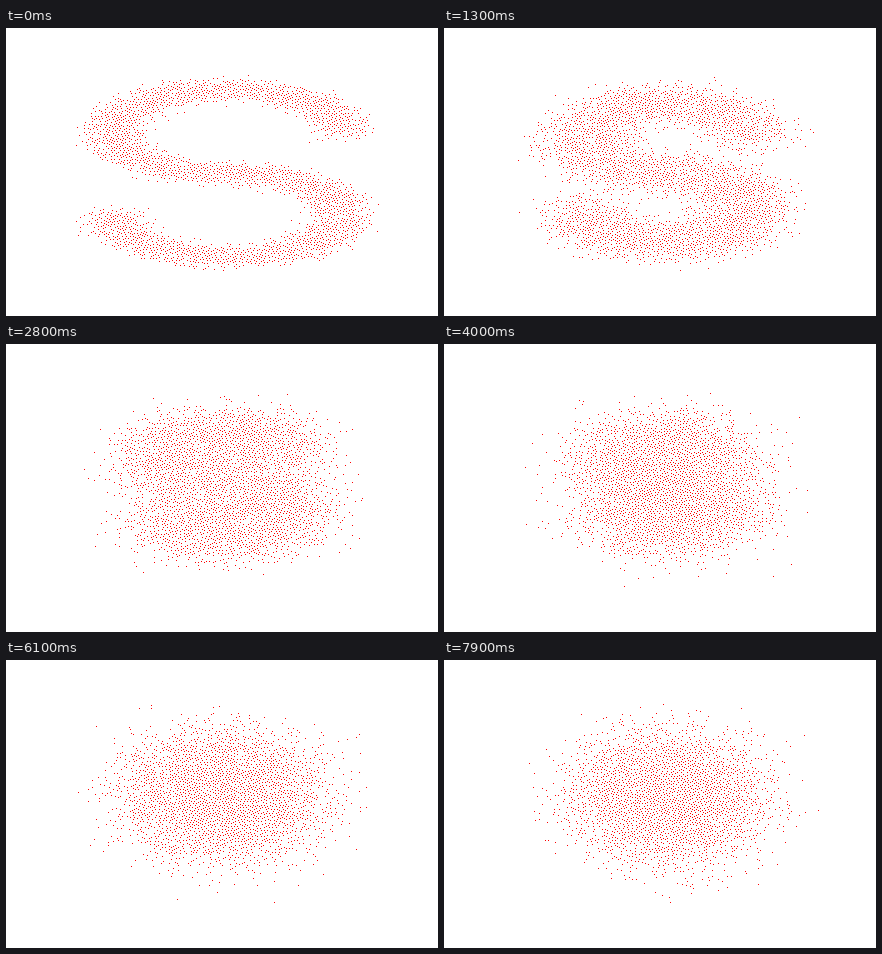
An HTML page with a canvas for the animation above (8000 ms loop, 432x288 px).

```html
<!DOCTYPE html>
<html lang="en">
<head>
<meta charset="utf-8">
<title>S-curve diffusion</title>
<style>
  html, body { margin: 0; width: 100%; height: 100%; overflow: hidden; background: #fff; }
  canvas { display: block; width: 432px; height: 288px; }
</style>
</head>
<body>
<canvas id="stage" width="432" height="288"></canvas>
<script>
const W = 432, H = 288;
const BOX = { left: 69, top: 44, right: 374, bottom: 242 };
const LOOP = 8000, STEP = 100, STEPS = 79;
const COUNT = 10000;
const CURVE_NOISE = 0.12, BETA_SLOPE = 6.5e-4;

// step, pixels per unit in x and y, centre x and y
const VIEW = [
  [0, 114, 41.7, 221, 145],
  [12, 84, 35.7, 222, 145],
  [27, 60, 28.5, 220, 140],
  [39, 49, 26.3, 223, 140],
  [51, 45, 25.3, 219, 135],
  [60, 46, 25, 217, 136],
  [78, 41, 26.5, 223, 137]
];

let seed = 20;
function random() {
  seed = (seed + 0x6D2B79F5) | 0;
  let t = Math.imul(seed ^ (seed >>> 15), 1 | seed);
  t = (t + Math.imul(t ^ (t >>> 7), 61 | t)) ^ t;
  return ((t ^ (t >>> 14)) >>> 0) / 4294967296;
}

function gaussianPair() {
  const radius = Math.sqrt(-2 * Math.log(1 - random()));
  const angle = 2 * Math.PI * random();
  return [radius * Math.cos(angle), radius * Math.sin(angle)];
}

function viewAt(step) {
  const i = Math.max(1, VIEW.findIndex(key => key[0] >= step));
  const a = VIEW[i - 1], b = VIEW[i];
  const mix = (step - a[0]) / (b[0] - a[0]);
  return a.map((value, n) => value + (b[n] - value) * mix);
}

const px = new Float32Array(COUNT), py = new Float32Array(COUNT);

function makeCurve() {
  for (let i = 0; i < COUNT; i++) {
    const t = 3 * Math.PI * (random() - 0.5);
    const [nx, ny] = gaussianPair();
    px[i] = Math.sin(t) + CURVE_NOISE * nx;
    py[i] = Math.sign(t) * (Math.cos(t) - 1) + CURVE_NOISE * ny;
  }
}

function diffuse(beta) {
  const keep = Math.sqrt(1 - beta), add = Math.sqrt(beta);
  for (let i = 0; i < COUNT; i++) {
    const [nx, ny] = gaussianPair();
    px[i] = keep * px[i] + add * nx;
    py[i] = keep * py[i] + add * ny;
  }
}

// Dots keep a small distance from each other, so dense areas stay evenly speckled.
function plot(step) {
  const [, sx, sy, cx, cy] = viewAt(step);
  const taken = new Uint8Array(W * H);
  const dots = [];
  for (let i = 0; i < COUNT; i++) {
    const x = Math.round(cx + px[i] * sx), y = Math.round(cy - py[i] * sy);
    if (x < BOX.left || x > BOX.right || y < BOX.top || y > BOX.bottom) continue;
    const at = y * W + x;
    if (taken[at]) continue;
    dots.push(at);
    for (let dy = -2; dy <= 2; dy++) {
      const reach = 2 - Math.abs(dy);
      taken.fill(1, at + dy * W - reach, at + dy * W + reach + 1);
    }
  }
  return dots;
}

makeCurve();
const frames = [];
for (let step = 0; step < STEPS; step++) {
  if (step) diffuse(BETA_SLOPE * step);
  frames.push(plot(step));
}

const ctx = document.getElementById("stage").getContext("2d");
let shown = -1;

function draw(step) {
  ctx.fillStyle = "#fff";
  ctx.fillRect(0, 0, W, H);
  ctx.fillStyle = "#f00";
  for (const at of frames[step]) ctx.fillRect(at % W, Math.floor(at / W), 1, 1);
}

function tick() {
  const time = performance.now() % LOOP;
  const step = Math.max(0, Math.floor(time / STEP) - 1);
  if (step !== shown) draw(shown = step);
  requestAnimationFrame(tick);
}
tick();
</script>
</body>
</html>
```
